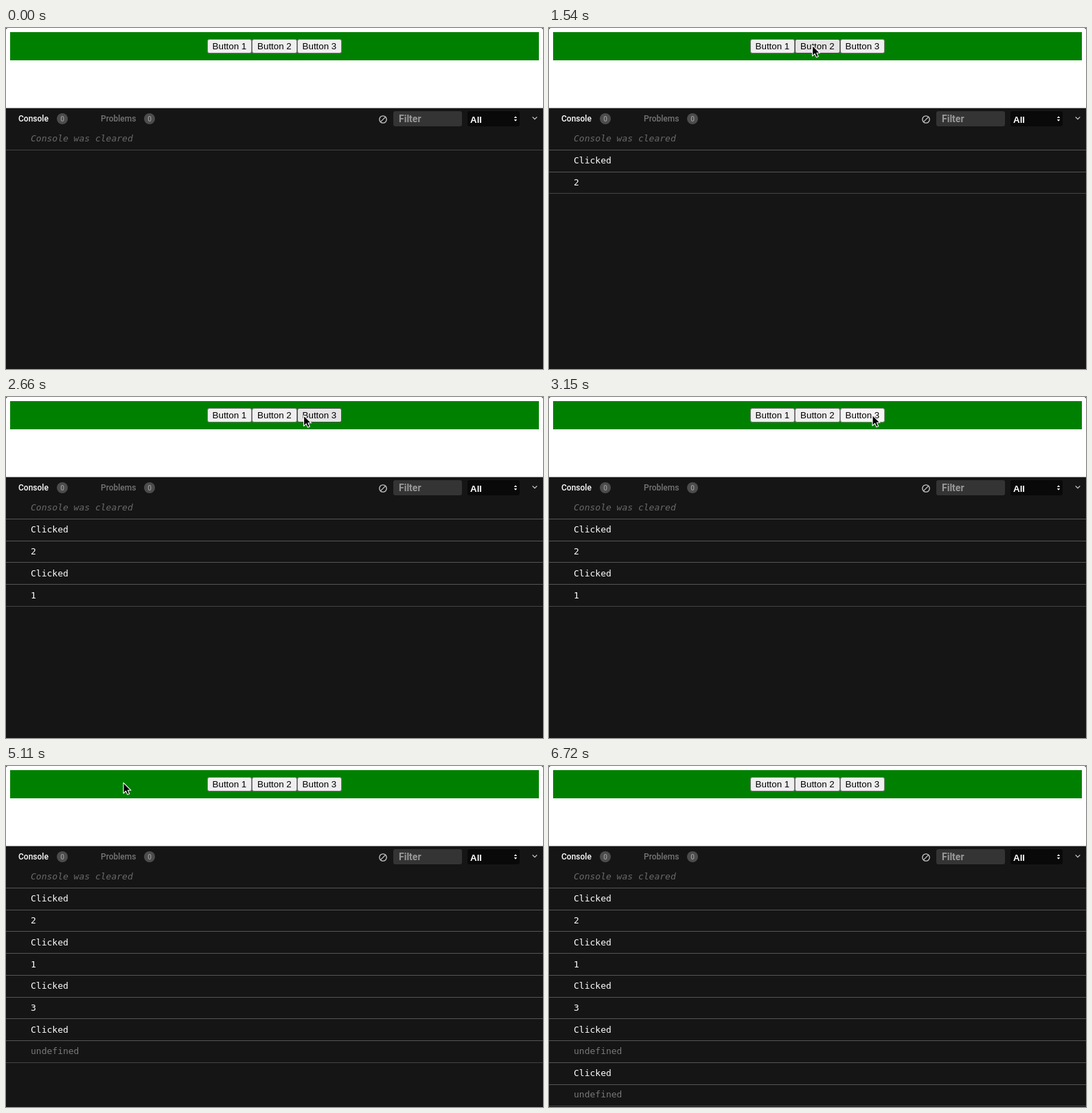
These frames come from a looping animation (782 px wide and 496 px high, 7210 ms). An HTML page:

```html
<!DOCTYPE html>
<html lang="en">
<head>
<meta charset="utf-8">
<title>Button clicks and console</title>
<style>
  html, body { margin: 0; width: 100%; height: 100%; overflow: hidden; background: #151515; }
  svg { display: block; }
  text { white-space: pre; }
  .ui { font-family: Roboto, sans-serif; font-weight: 500; font-size: 12px; }
  .filter { font-size: 14px; font-weight: 600; fill: #999; }
  .all { font: bold 13.333px "Liberation Sans", Arial, sans-serif; fill: #fff; }
  .badge { font-size: 10px; fill: #999; text-anchor: middle; }
  .btn { font: 13.333px "Liberation Sans", Arial, sans-serif; text-anchor: middle; fill: #000; }
  .log { font: 13px "DejaVu Sans Mono", monospace; fill: #fff; }
  .dim { fill: #7a7a7a; }
  .cleared { font-style: italic; fill: #6a6a6a; }
</style>
</head>
<body>
<svg width="782" height="496" viewBox="0 0 782 496">
  <path d="M0 117V3Q0 0 3 0H779Q782 0 782 3V117Z" fill="#fff"/>
  <rect x="6" y="6" width="770" height="41" fill="#008000"/>
  <g id="buttons"></g>

  <rect y="116.5" width="782" height="380" fill="#151515"/>
  <g class="ui">
    <g id="tabs"></g>
    <rect x="564" y="121" width="100" height="22" rx="3" fill="#343434"/>
    <text class="filter" x="572" y="137">Filter</text>
    <rect x="672" y="121" width="76" height="22" rx="3" fill="#090909"/>
    <text class="all" x="676" y="138">All</text>
  </g>
  <path d="M739.8 131L742 128.3L744.2 131ZM739.8 133L742 135.7L744.2 133Z" fill="#fff"/>
  <g fill="none" stroke="#ccc" stroke-width="1.3">
    <circle cx="549" cy="133" r="5.2"/>
    <path d="M552.6 129.4L545.4 136.6"/>
    <path d="M766.7 129.4L770 132.7L773.3 129.4"/>
  </g>
  <text class="log cleared" x="36" y="165">Console was cleared</text>
  <g id="rows"></g>

  <g id="cursor">
    <g id="ring" fill="none">
      <circle cx="0.5" cy="2.5" r="20" stroke="#fff" stroke-width="5.5"/>
      <circle cx="0.5" cy="2.5" r="20" stroke="#000" stroke-width="3"/>
    </g>
    <path d="M0.5 1.3V16.8L4.1 13.4L6.4 18.6L9.2 17.4L6.9 12.3H11.5Z" fill="#000" stroke="#fff" stroke-width="1.1" stroke-linejoin="round"/>
  </g>
</svg>
<script>
const LOOP = 7210, TICK = 70, HOLD = 140, ENTER = 280, LEAVE = 6720;
const $ = id => document.getElementById(id);

function add(parent, tag, attrs, text) {
  const el = document.createElementNS('http://www.w3.org/2000/svg', tag);
  for (const k in attrs) el.setAttribute(k, attrs[k]);
  if (text) el.textContent = text;
  parent.append(el);
  return el;
}

function addTab(label, x, badgeX, fill) {
  add($('tabs'), 'text', { x, y: 136, fill }, label);
  add($('tabs'), 'circle', { cx: badgeX, cy: 132, r: 8, fill: '#4c4c4c' });
  add($('tabs'), 'text', { class: 'badge', x: badgeX, y: 135.5 }, '0');
}
addTab('Console', 18, 82, '#fff');
addTab('Problems', 138, 209, '#757575');

// Buttons
const BTN = { x: 292.7, y: 16, w: 65.5, h: 21 };
const LOOKS = {
  idle: ['#efefef', '#767676'],
  hover: ['#e5e5e5', '#4f4f4f'],
  active: ['#f5f5f5', '#8d8d8d']
};
const edge = i => Math.round(BTN.x + i * BTN.w);
const buttons = [0, 1, 2].map(i => {
  const box = add($('buttons'), 'rect', {
    x: edge(i) + 0.5, y: BTN.y + 0.5, width: edge(i + 1) - edge(i) - 1, height: BTN.h - 1, rx: 2.5
  });
  add($('buttons'), 'text', { class: 'btn', x: BTN.x + (i + 0.5) * BTN.w, y: 31 }, `Button ${i + 1}`);
  return box;
});

// The first press only gives the page focus and logs nothing
const clicks = [
  { at: 980 },
  { at: 1400, value: '2' },
  { at: 2310, value: '1' },
  { at: 3080, value: '3', ring: TICK },
  { at: 4130, value: 'undefined' },
  { at: 5600, value: 'undefined', ring: TICK }
];
const logged = clicks.filter(c => c.value);

// Console rows, two per logged click
const PITCH = 31.75;
const words = logged.flatMap(c => ['Clicked', c.value]);
const rows = words.map((word, k) => {
  const dim = word === 'undefined';
  const y = Math.round(197.3 + PITCH * k) - dim;
  return add($('rows'), 'text', { class: dim ? 'log dim' : 'log', x: 36, y }, word);
});
const rules = ['', ...words].map((_, k) =>
  add($('rows'), 'rect', { y: Math.round(176.9 + PITCH * k), width: 782, height: 1 }));

// Cursor moves; it rests in between
const home = { x: 318, y: 320 };
const moves = [
  { from: ENTER, to: 560, x: 335, y: 32 },
  { from: 560, to: 980, x: 372.5, y: 23.5 },
  { from: 1050, to: 1260, x: 383, y: 24 },
  { from: 1750, to: 2310, x: 323.5, y: 27 },
  { from: 2380, to: 2940, x: 470.5, y: 25 },
  { from: 3360, to: 3850, x: 170.5, y: 23 },
  { from: 6440, to: LEAVE, x: 144, y: 463 }
];

// Smooth step with a quicker start
function ease(u) {
  const s = 1 - (1 - u) ** 1.6;
  return s * s * (3 - 2 * s);
}

function cursorAt(t) {
  let { x, y } = home;
  for (const m of moves) {
    if (t <= m.from) break;
    const s = ease(Math.min(1, (t - m.from) / (m.to - m.from)));
    x += (m.x - x) * s;
    y += (m.y - y) * s;
  }
  return { x, y };
}

function show(el, on) {
  el.setAttribute('visibility', on ? 'visible' : 'hidden');
}

function draw(ms) {
  const t = Math.floor((ms % LOOP) / TICK) * TICK;
  const present = t >= ENTER && t < LEAVE;
  const { x, y } = cursorAt(t);
  const press = clicks.find(c => t >= c.at && t < c.at + HOLD);

  $('cursor').style.display = present ? '' : 'none';
  $('cursor').setAttribute('transform', `translate(${x} ${y})`);
  show($('ring'), press && t < press.at + (press.ring || HOLD));

  const inside = present && y >= BTN.y && y < BTN.y + BTN.h;
  const over = inside ? Math.floor((x - BTN.x) / BTN.w) : -1;
  buttons.forEach((box, i) => {
    const [fill, stroke] = LOOKS[i !== over ? 'idle' : press ? 'active' : 'hover'];
    box.setAttribute('fill', fill);
    box.setAttribute('stroke', stroke);
  });

  const count = 2 * logged.filter(c => t >= c.at + HOLD).length;
  rows.forEach((row, k) => show(row, k < count));
  rules.forEach((rule, k) => {
    show(rule, k <= count);
    rule.setAttribute('fill', k < count ? '#555' : '#444');
  });
}

const start = performance.now();
function frame() {
  draw(performance.now() - start);
  requestAnimationFrame(frame);
}
frame();
</script>
</body>
</html>
```
